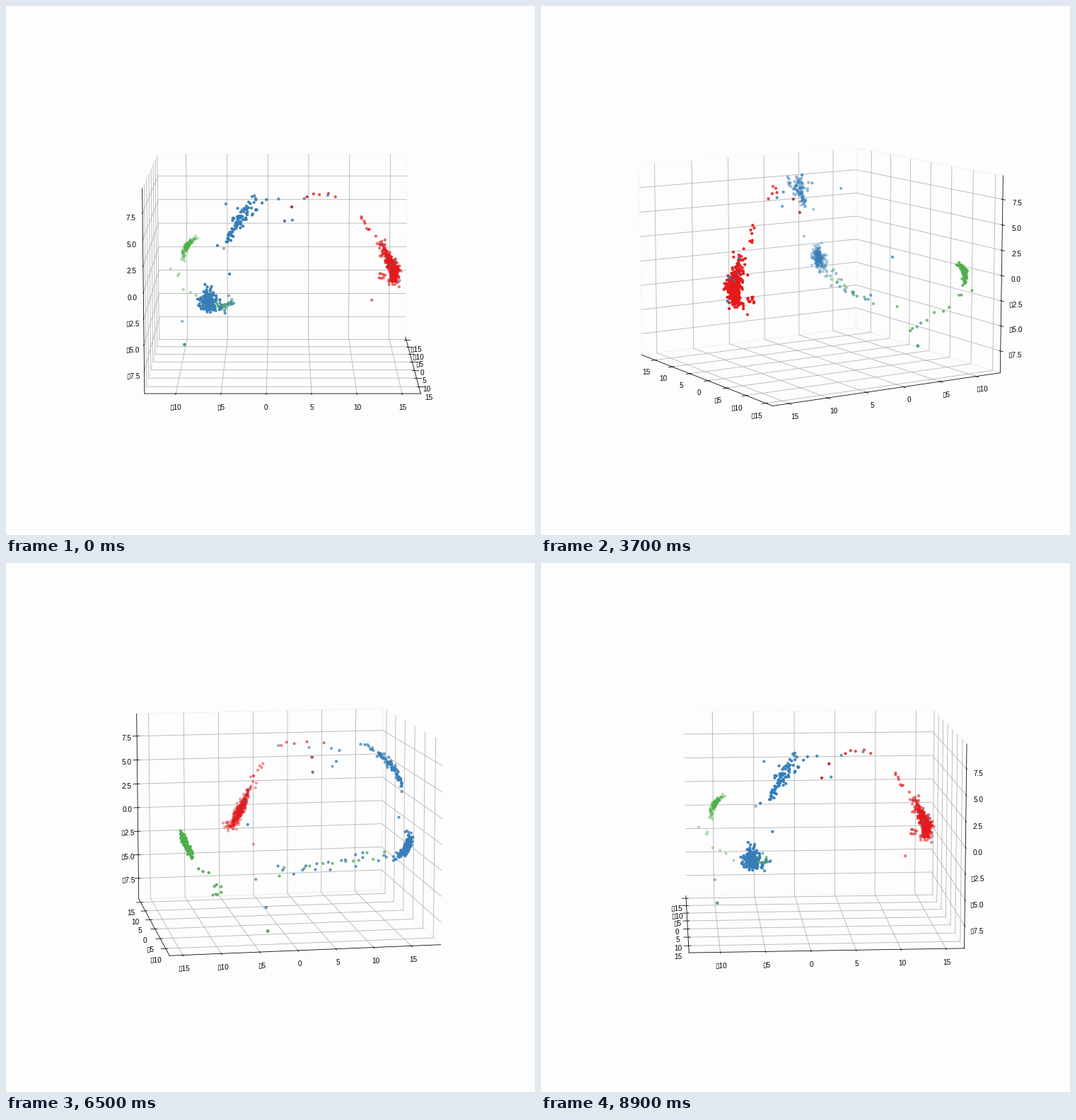
Write a matplotlib script that moves like this. It is 748 px wide and 748 px high and loops after 9 s.

```python
import matplotlib.pyplot as plt
import numpy as np
from matplotlib.animation import FuncAnimation

SIZE, DPI = 748, 72
FRAMES, INTERVAL = 90, 100
PAPER = "#fdfdfd"
RED, BLUE, GREEN = "#e41a1c", "#377eb8", "#4daf4a"

plt.rcParams["font.family"] = ["Liberation Sans", "DejaVu Sans"]
rng = np.random.default_rng(7)

LOW = np.array([-16.7, -13.45, -9.7])
HIGH = np.array([18.98, 17.06, 9.82])
BOX = np.array([1.1905, 1.1905, 0.8929])  # drawn proportions of the cube


def bend(arc, t):
    """Points on the quadratic curve given by start, control and end."""
    a, b, c = np.array(arc)
    t = np.asarray(t)[:, None]
    return (1 - t) ** 2 * a + 2 * t * (1 - t) * b + t ** 2 * c


def strand(n, arc, mid, dev, side=(0.72, 0.69, 0), width=(0, 0), thin=0.005):
    """Dense cloud round a curve, spread mainly along one direction."""
    t = np.clip(rng.normal(mid, dev, n), 0, 1)
    spread = rng.normal(0, 1, n) * (width[0] + (width[1] - width[0]) * t)
    return bend(arc, t) + np.outer(spread, side) + rng.normal(0, thin, (n, 3))


def trail(n, arc, jitter):
    """A few loose points spaced evenly along a curve."""
    return bend(arc, np.linspace(0, 1, n)) + rng.normal(0, jitter, (n, 3))


# Curves in box units, measured from the centre of the cube
red_arc = (-.031, .357, .229), (-.107, .539, -.003), (-.155, .513, -.104)
high_arc = (.495, -.240, .205), (.483, -.170, .310), (.340, -.120, .375)
low_arc = (.512, -.315, .010), (.536, -.327, -.069), (.440, -.320, -.120)
green_arc = (-.518, -.410, .055), (-.510, -.478, .014), (-.474, -.474, -.050)
tail_arc = (.420, -.290, -.100), (.200, -.240, -.130), (-.050, -.240, -.170)
far_arc = (-.470, -.520, -.080), (-.310, -.470, -.200), (-.350, -.250, -.265)
top_red = (.209, .100, .358), (.060, .160, .360), (.031, .247, .327)
top_blue = (.201, -.244, .328), (.330, .000, .370), (.016, .200, .335)
pair = (.143, .041, .300), (.142, .025, .268), (.140, .009, .236)
spur = (-.180, .460, -.060), (-.190, .456, -.072), (-.200, .453, -.085)
floor_dot = (-.146, -.455, -.388)

groups = [
    (RED, [strand(335, red_arc, .68, .17, width=(.020, .016), thin=.004),
           strand(9, red_arc, .2, .12, width=(.012, .020)),
           strand(9, spur, .5, .3, thin=.007),
           trail(5, top_red, .006),
           trail(2, pair, 0),
           [(-.068, .409, -.163)]]),
    (BLUE, [strand(90, high_arc, .42, .26, side=(.5, .87, 0),
                   width=(.005, .036), thin=.004),
            strand(190, low_arc, .48, .2, side=(0, 1, 0),
                   width=(.014, .014), thin=.006),
            strand(9, red_arc, .45, .18, width=(.016, .016)),
            trail(5, top_blue, .006),
            trail(2, pair, 0),
            trail(18, tail_arc, .018),
            [(.488, -.281, .183), (.488, -.229, .058), (.238, .043, .255),
             (-.204, -.272, .054), (-.155, -.465, -.280), floor_dot]]),
    (GREEN, [strand(115, green_arc, .38, .18, thin=.005),
             strand(9, green_arc, .85, .1, thin=.006),
             trail(12, tail_arc, .012),
             trail(10, far_arc, .012),
             [(-.176, -.318, -.184)] + [floor_dot] * 3]),
]

clouds = [np.vstack(parts) for _, parts in groups]
colors = [color for (color, _), cloud in zip(groups, clouds) for _ in cloud]
points = (LOW + HIGH) / 2 + np.vstack(clouds) * (HIGH - LOW) / BOX

fig = plt.figure(figsize=(SIZE / DPI, SIZE / DPI), dpi=DPI, facecolor=PAPER)
ax = fig.add_subplot(projection="3d", facecolor=PAPER)
ax.scatter(*points.T, c=colors, s=10)
ax.set(xlim=(LOW[0], HIGH[0]), ylim=(LOW[1], HIGH[1]), zlim=(LOW[2], HIGH[2]))


def style(axis, ticks, fmt):
    axis.set_ticks(ticks)
    # negative numbers carry a hollow box in place of the minus sign
    axis.set_major_formatter(lambda v, _: format(v, fmt).replace("-", "\u25af"))
    axis.pane.fill = False


style(ax.xaxis, np.arange(-15, 16, 5), ".0f")
style(ax.yaxis, np.arange(-10, 16, 5), ".0f")
style(ax.zaxis, np.arange(-7.5, 8, 2.5), ".1f")


def turn(i):
    # the tiny offset keeps the side wall on the left in the head-on view
    ax.view_init(elev=10, azim=i * 360 / FRAMES + 1e-3)
    return []


anim = FuncAnimation(fig, turn, frames=FRAMES, interval=INTERVAL,
                     repeat=True, repeat_delay=0)
plt.show()
```
